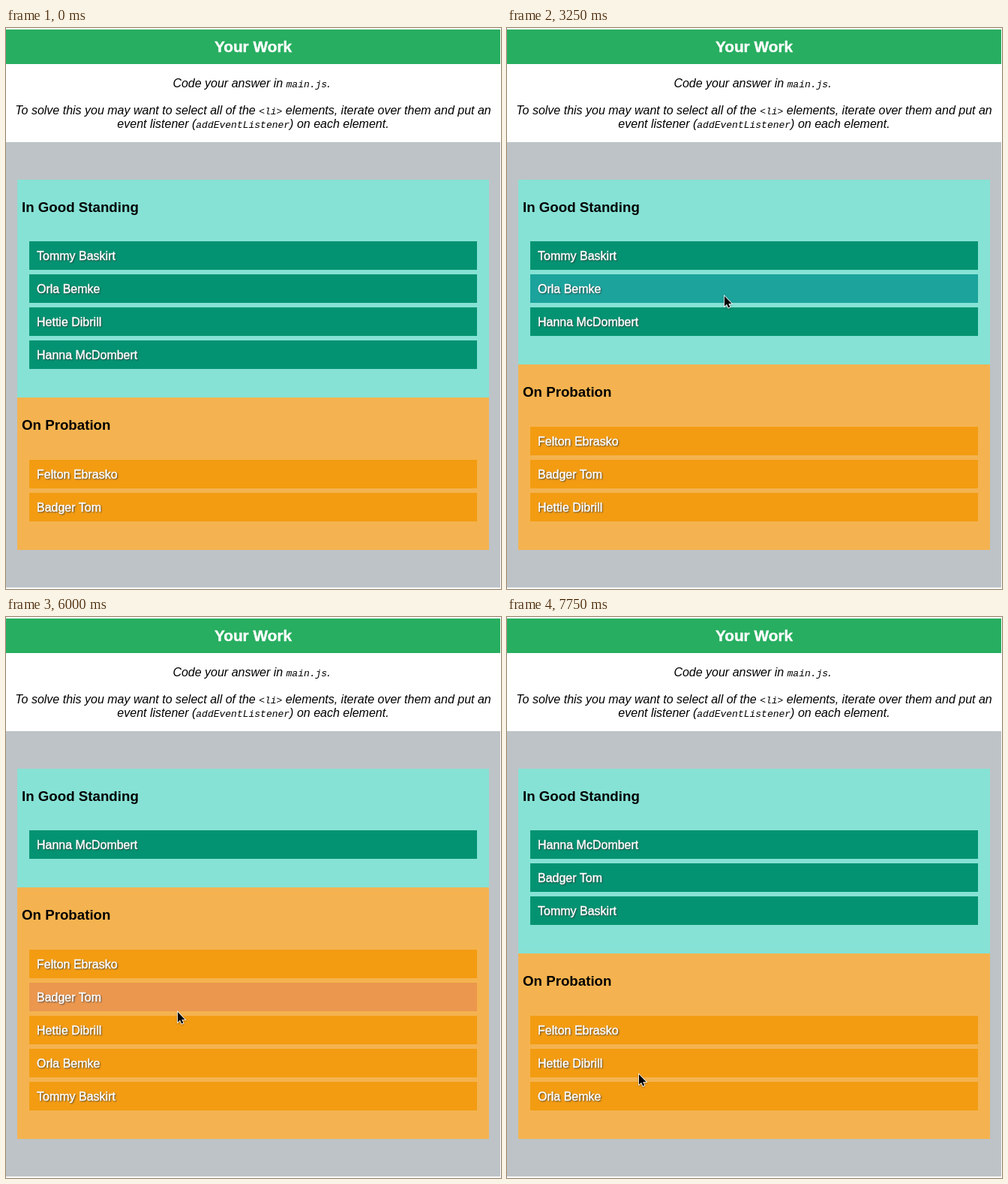
Animation, 660 px wide and 747 px high, one loop 8 s. Source, as an HTML page:

```html
<!DOCTYPE html>
<html lang="en">
<head>
<meta charset="utf-8">
<title>Your Work</title>
<style>
  html, body { margin: 0; width: 100%; height: 100%; overflow: hidden; background: #fff; }
  #stage { position: relative; width: 660px; height: 747px; overflow: hidden;
    font: 16px/18px "Liberation Sans", Arial, Helvetica, sans-serif; color: #000; }
  #stage > *, .item, h3 { position: absolute; margin: 0; white-space: nowrap; }
  h1, .item { color: #fff; -webkit-text-stroke: .4px #fff; }
  h1 { left: 0; top: 2px; width: 659px; height: 35px; padding-top: 11px; background: #27ae60;
    font-size: 20.8px; line-height: 24px; text-align: center; }
  p { width: 659px; text-align: center; font-style: italic; }
  #task { left: -2px; top: 65px; }
  #hint { left: 0; top: 101px; }
  code { font: italic 13px/13px "Liberation Mono", "Courier New", monospace; }
  #back { left: 0; top: 152px; width: 659px; height: 593px; background: #bdc3c7; }
  .panel { left: 15px; width: 629px; }
  h3 { left: 6px; top: 26px; font-size: 18.72px; line-height: 22px; }
  #good { top: 202px; background: #86e2d5; }
  #bad { background: #f4b350; }
  .item { left: 31px; width: 587px; height: 27px; padding: 11px 0 0 10px;
    text-shadow: 1px 1px 2px #333; }
  #cursor { overflow: visible; filter: drop-shadow(0 1px 1px rgba(0,0,0,.3)); }
  #cursor path { stroke: #fff; stroke-width: 1.6; paint-order: stroke; }
</style>
</head>
<body>
<div id="stage">
  <h1>Your Work</h1>
  <p id="task">Code your answer in <code>main.js</code>.</p>
  <p id="hint">To solve this you may want to select all of the <code>&lt;li&gt;</code> elements, iterate over them and put an<br>event listener (<code>addEventListener</code>) on each element.</p>
  <div id="back"></div>
  <div class="panel" id="good"><h3>In Good Standing</h3></div>
  <div class="panel" id="bad"><h3>On Probation</h3></div>
  <svg id="cursor" width="14" height="20">
    <path d="M1 1V14.6L4.1 11.7L6.2 16.6L8.4 15.6L6.3 10.9H10.6Z"/>
  </svg>
</div>
<script>
const STEP = 250, LOOP = 8000;
const TOP = 202, BOTTOM = 695, PITCH = 44, ITEM = 38;
const FOCUS = 7;   // step at which the page starts to react to the pointer
const LAG = 0.5;   // steps by which the highlight trails the pointer
const NAMES = ["Tommy Baskirt", "Orla Bemke", "Hettie Dibrill",
  "Hanna McDombert", "Felton Ebrasko", "Badger Tom"];
const GOOD = { fill: "#049372", hover: "#1ba39c" };
const BAD = { fill: "#f39c12", hover: "#eb974e" };

// Clicks: [step, person]
const CLICKS = [[8, 2], [14, 1], [18, 0], [25, 5], [29, 0]];

// Key points of the pointer's path: [step, x, y]
const PATH = [
  [1, 506, 1], [3, 324, 403], [5, 320, 399], [7, 320, 399], [9, 305, 395],
  [13, 289, 356], [15, 289, 356], [16.5, 284, 312], [18.5, 281, 310],
  [19.5, 277, 318], [20, 265, 341], [24, 228, 525], [25, 230, 532],
  [25.5, 234, 580], [26, 236, 591], [28, 212, 640], [30, 180, 646],
  [30.5, 177, 615], [31, 175, 608]
];

const $ = id => document.getElementById(id);
const stage = $("stage"), good = $("good"), bad = $("bad"), cursor = $("cursor");
const items = NAMES.map(name => {
  const el = document.createElement("div");
  el.className = "item";
  el.textContent = name;
  stage.insertBefore(el, cursor);
  return el;
});

function pointerAt(step) {
  const next = PATH.findIndex(p => p[0] > step);
  if (next === 0) return null;
  if (next < 0) return PATH[PATH.length - 1].slice(1);
  const [t0, x0, y0] = PATH[next - 1], [t1, x1, y1] = PATH[next];
  const k = (step - t0) / (t1 - t0);
  return [x0 + (x1 - x0) * k, y0 + (y1 - y0) * k].map(Math.round);
}

function listsAt(step) {
  let lists = [[0, 1, 2, 3], [4, 5]];
  for (const [when, who] of CLICKS) {
    if (when > step) break;
    lists = lists.map(l => l.includes(who) ? l.filter(i => i !== who) : [...l, who]);
  }
  return lists;
}

function place(list, top, colors, hoverY) {
  list.forEach((who, row) => {
    const y = top + row * PITCH;
    const hit = hoverY >= y && hoverY < y + ITEM;
    items[who].style.top = y + "px";
    items[who].style.background = hit ? colors.hover : colors.fill;
  });
}

function draw(step) {
  const [ok, probation] = listsAt(step);
  const split = TOP + 114 + PITCH * ok.length;
  const hoverY = step < FOCUS ? -1 : pointerAt(step - LAG)[1];
  good.style.height = split - TOP + "px";
  bad.style.top = split + "px";
  bad.style.height = BOTTOM - split + "px";
  place(ok, TOP + 82, GOOD, hoverY);
  place(probation, split + 83, BAD, hoverY);

  const pos = pointerAt(step);
  cursor.style.display = pos ? "block" : "none";
  if (pos) {
    cursor.style.left = pos[0] + "px";
    cursor.style.top = pos[1] + "px";
  }
}

let shown = -1;
function tick() {
  const step = Math.floor(performance.now() % LOOP / STEP);
  if (step !== shown) draw(shown = step);
  requestAnimationFrame(tick);
}
tick();
</script>
</body>
</html>
```
